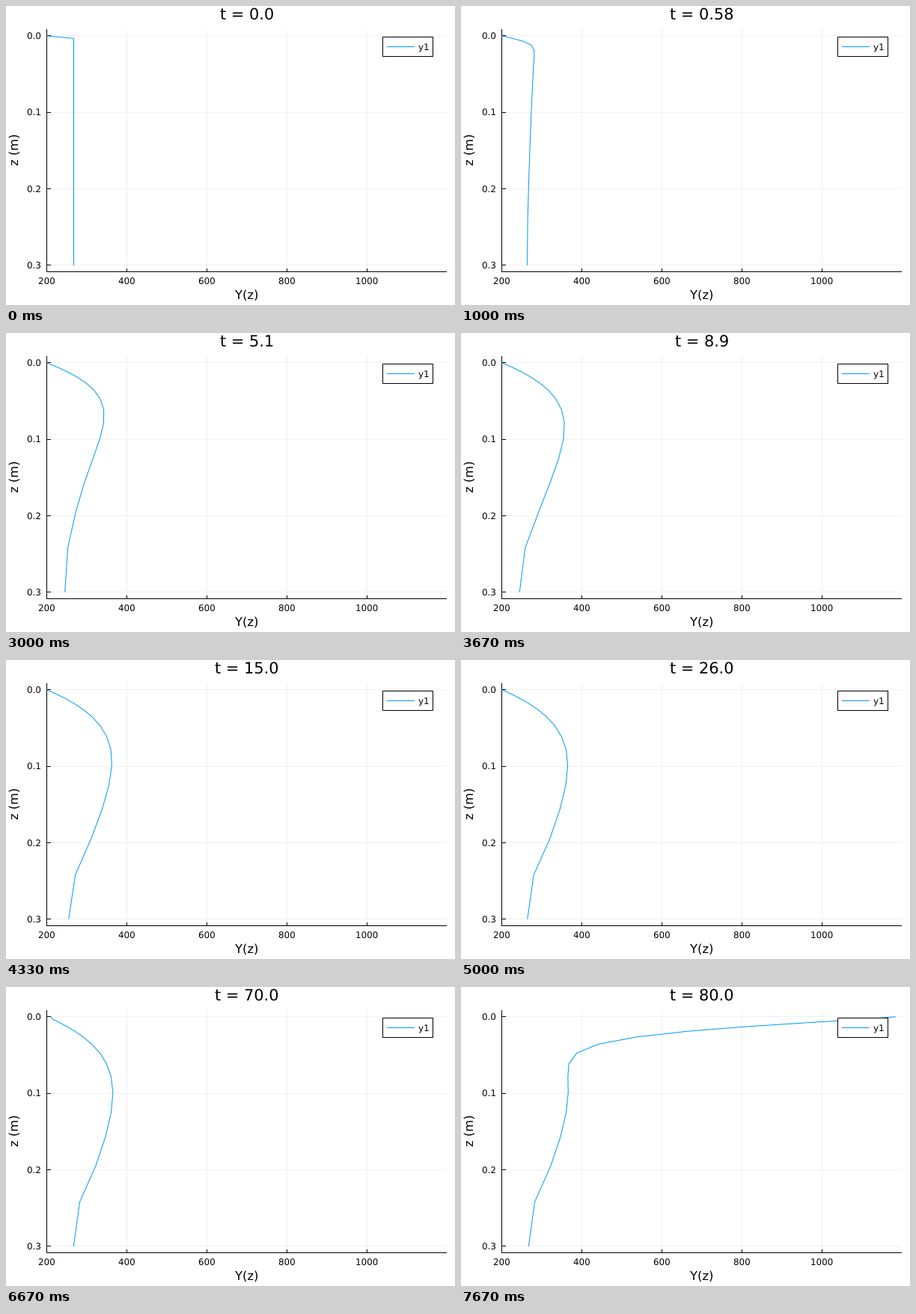
Animation of 600x400 px, one loop 8 s. Source, as a matplotlib script:

```python
import numpy as np
import matplotlib.pyplot as plt
from matplotlib.animation import FuncAnimation
from matplotlib.patches import PathPatch, Rectangle
from matplotlib.textpath import TextPath
from matplotlib.transforms import Affine2D

WIDTH, HEIGHT, DPI = 600, 400, 100
PX = 72 / DPI
BLUE = "#009afa"
LEFT, RIGHT, TOP, BOTTOM = 54, 588, 31, 355
MID_X, MID_Y = 321.85, 193.2
TITLE_SIZE, GUIDE_SIZE, TICK_SIZE = 20.9, 16.4, 11.9

LOOP_MS, TICK_MS, STEPS = 8000, 20, 24
TICKS = LOOP_MS // TICK_MS

# Depth grid growing geometrically away from the surface
NODES, GROWTH, MAX_DEPTH = 15, 1.224, 0.3
DEPTH = MAX_DEPTH * (GROWTH ** np.arange(NODES + 1) - 1) / (GROWTH ** NODES - 1)

INITIAL, SURFACE = 267, 200
HEAT_STEP, HEAT_START, HEAT_RATE = 20, 70, 98.4


def step_time(step):
    """Solver time of a step: roughly exponential, restarting when heating begins."""
    if step > HEAT_STEP:
        share = (step - HEAT_STEP) / (STEPS - 1 - HEAT_STEP)
        return 70.1 + 9.9 * share ** 1.35
    keys = [0, 3, 6, 11, 13, 17, HEAT_STEP]
    return np.expm1(np.interp(step, keys, np.log1p([0, 0.58, 2, 8.9, 15, 46, 70.1])))


def profile(t):
    u = DEPTH / 0.1
    sag = 15 * np.exp(-((DEPTH - 0.236) / 0.03) ** 2)
    steady = SURFACE + 165 * u * np.exp(1 - u) - sag

    # The bulk drifts from its initial value until the steady state reaches it
    rate = np.maximum(56 * np.exp(-DEPTH / 0.25) - 26, -6.5)
    bulk = INITIAL + rate * 6 * (1 - np.exp(-t / 6))
    reach = max(0.017 * t * np.exp(t / 20), 1e-9)
    settled = np.exp(-(DEPTH / reach) ** 1.45)
    values = bulk + (steady - bulk) * settled

    heated = t - HEAT_START
    if heated > 0:
        front = 0.0203 * (heated / 10) ** 0.62
        values += HEAT_RATE * heated * np.exp(-(DEPTH / front) ** 1.25)
    return values


def to_x(value):
    return 54.7 + (np.asarray(value) - 200) * 0.5344


def to_y(depth):
    return 39.9 + np.asarray(depth) * 1022


def text_path(text, size, x, y, align=0.5, angle=0):
    """Text outline starting on a whole pixel; align is the anchor's share of the advance."""
    def right_edge(s):
        return TextPath((0, 0), s, size=size).get_extents().x1

    shift = align * (right_edge(text + "|") - right_edge("|"))
    turn = np.radians(angle)
    start = np.round([x - shift * np.cos(turn), y - shift * np.sin(turn)])
    move = Affine2D().scale(1, -1).rotate_deg(angle).translate(*start)
    return TextPath((0, 0), text, size=size).transformed(move)


def add_text(*args, **kwargs):
    patch = PathPatch(text_path(*args, **kwargs), fc="black", lw=0, zorder=6)
    return ax.add_patch(patch)


def add_line(xs, ys, color="black", zorder=3, **kwargs):
    return ax.plot(xs, ys, color=color, lw=PX, zorder=zorder, **kwargs)[0]


plt.rcParams["font.family"] = "DejaVu Sans"
fig = plt.figure(figsize=(WIDTH / DPI, HEIGHT / DPI), dpi=DPI, facecolor="white")
ax = fig.add_axes([0, 0, 1, 1])
ax.set_xlim(0, WIDTH)
ax.set_ylim(HEIGHT, 0)
ax.axis("off")

for value in range(200, 1001, 200):
    x = int(to_x(value))
    if value > 200:
        add_line([x, x], [TOP, BOTTOM], alpha=0.06, zorder=1)
    add_line([x, x], [BOTTOM - 4, BOTTOM])
    add_text(str(value), TICK_SIZE, to_x(value), 372)

for depth in (0, 0.1, 0.2, 0.3):
    y = int(to_y(depth))
    add_line([LEFT, RIGHT], [y, y], alpha=0.06, zorder=1)
    add_line([LEFT, LEFT + 5], [y, y])
    add_text(f"{depth:.1f}", TICK_SIZE, 47, to_y(depth) + 4.35, align=1)

add_line([LEFT, LEFT], [TOP, BOTTOM])
add_line([LEFT, RIGHT], [BOTTOM, BOTTOM])
add_text("Y(z)", GUIDE_SIZE, MID_X, 392)
add_text("z (m)", GUIDE_SIZE, 16, MID_Y, angle=-90)

curve = add_line([], [], color=BLUE, zorder=4, solid_joinstyle="round")

ax.add_patch(Rectangle((503, 41), 67, 26, fc="white", ec="black", lw=PX, zorder=5))
add_line([509, 545], [54, 54], color=BLUE, zorder=6)
add_text("y1", TICK_SIZE, 551, 59, align=0)

title = add_text("t = 0.0", TITLE_SIZE, MID_X, 18)


def update(tick):
    # Steps do not divide evenly into ticks, so each starts on the nearest one
    step = (tick * STEPS + 16) // TICKS
    t = step_time(step)
    curve.set_data(to_x(profile(t)), to_y(DEPTH))
    label = f"t = {float(f'{t:.2g}')}"
    title.set_path(text_path(label, TITLE_SIZE, MID_X, 18))
    return curve, title


anim = FuncAnimation(fig, update, frames=TICKS, interval=TICK_MS,
                     repeat=True, repeat_delay=0, blit=False)
plt.show()
```
